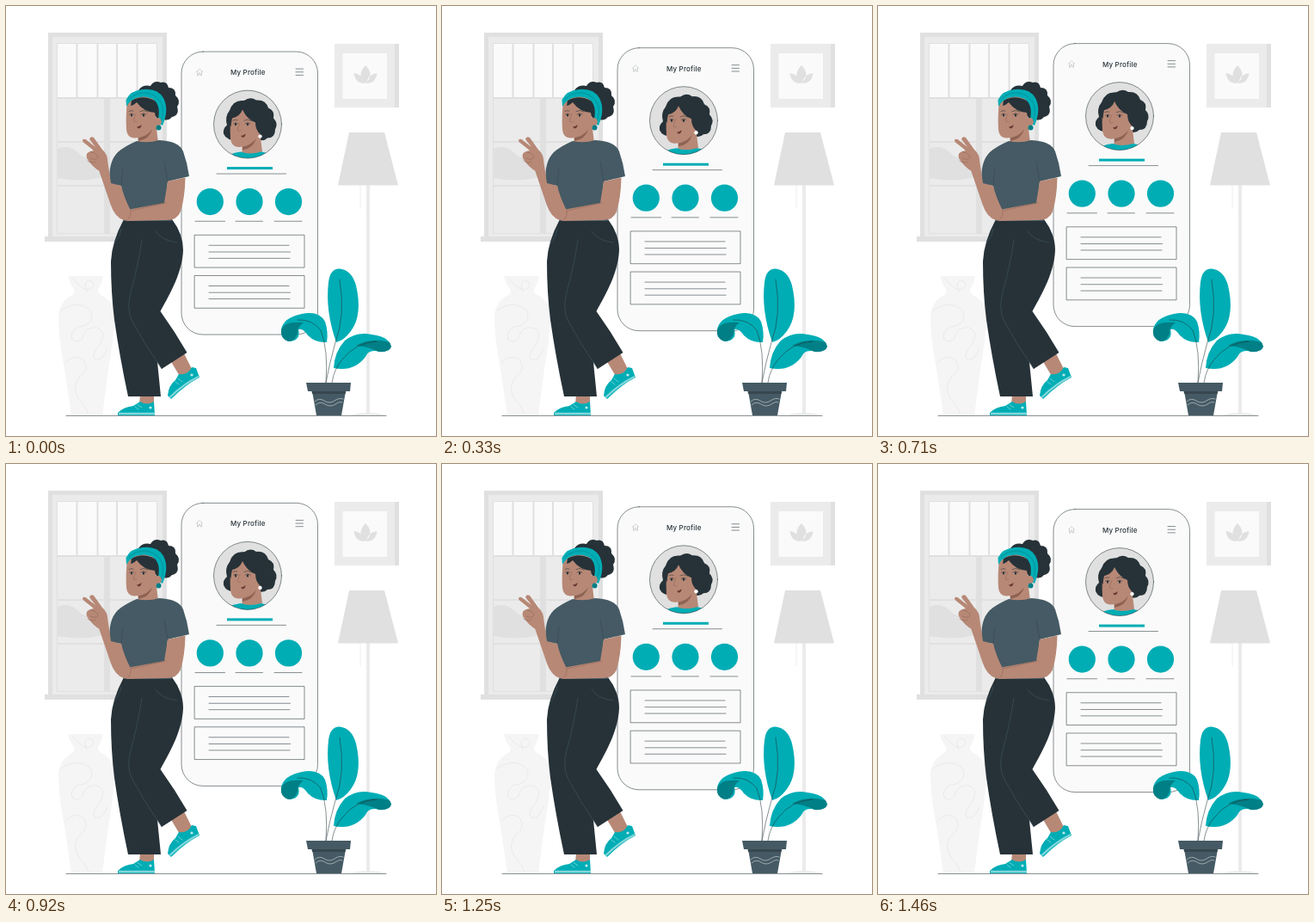
Write an HTML page that moves like this. It is 500x500 px and loops after 1500 ms.

```html
<!DOCTYPE html>
<html lang="en">
<head>
<meta charset="utf-8">
<title>Profile screen</title>
<style>
  html, body { margin: 0; width: 100%; height: 100%; overflow: hidden; background: #fff; }
  svg { display: block; width: 100vw; height: 100vh; }
  .teal { fill: #00adb5; }
  .deep { fill: #007f86; }
  .dark { fill: #263238; }
  .slate { fill: #455a64; }
  .skin { fill: #b78876; }
  .g1 { fill: #f5f5f5; }
  .g2 { fill: #ebebeb; }
  .g3 { fill: #e0e0e0; }
  .pane { fill: #fafafa; }
  .line { fill: none; stroke: #263238; stroke-width: .55; stroke-linecap: round; stroke-linejoin: round; }
  .seam { stroke: #455a64; }
  .fold { stroke: #8f6353; }
  .pale { stroke: #e0e0e0; }
  text { font: 500 8px Inter, "Open Sans", sans-serif; letter-spacing: .2px; text-anchor: middle; }
</style>
</head>
<body>
<svg viewBox="0 0 500 500">
  <defs>
    <clipPath id="round"><circle cx="281" cy="137" r="39.5"/></clipPath>
    <g id="face">
      <path class="skin" d="M153.500 140 V160 Q165 164 177 159 L174 135Z"/>
      <path d="M154 153 Q165 151 170 143 Q167 155 154 157Z" fill="#8f6353"/>
      <path class="skin" d="M141 110 Q139 128 140 144 Q141 153 149 153.500 Q160 154 168 145 L172 138 Q180 141 181 134 Q180 128 174 130 L172 108 Q154 98 141 110Z"/>
      <path class="line" d="M143 122.500 Q145 121 148 122 M156 122.500 Q160 120 165 123"/>
      <ellipse class="dark" cx="146" cy="127" rx="1.1" ry="1.6"/>
      <ellipse class="dark" cx="160" cy="127" rx="1.2" ry="1.7"/>
      <path class="line" d="M143.500 126 Q146 124 148.500 126 M157 126 Q160 123.500 163 126"/>
      <path class="line fold" d="M151 125 Q148 131 148.500 134 Q150 135.500 152 134.500"/>
      <path d="M152 140.500 Q155 140 157.500 138 Q157.500 142 154 142.500Z" fill="#6b3a33"/>
    </g>
  </defs>

  <!-- window -->
  <path class="g3" d="M49 31 H187 V269 H49Z"/>
  <path class="g2" d="M54 36 H182 V268 H54Z"/>
  <path class="g3" d="M59 43 H176 V265 H59Z"/>
  <path class="pane" d="M60 44h21.500v62h-21.500z M83.500 44h22v62h-22z M107.500 44h20.500v62h-20.500z M130 44h21.500v62h-21.500z M153.500 44H175v62h-21.500z"/>
  <path class="g2" d="M60 108h54v49H60z M121 108h54v49h-54z M60 159h54v49H60z M121 159h54v49h-54z M60 210h54v54H60z M121 210h54v54h-54z"/>
  <path class="g3" d="M60 166 Q72 161 82 169 Q91 179 101 177 Q110 177 114 184 V198 Q92 206 60 200Z"/>
  <path class="g3" d="M45 268 H190 V274 H45Z"/>

  <!-- wall picture -->
  <path class="g3" d="M382 44 H457 V118 H382Z"/>
  <path class="g2" d="M382 44 H452 V118 H382Z"/>
  <path class="pane" d="M391.500 55 H443 V108 H391.500Z"/>
  <path class="g3" d="M418 69 Q429 80 418 90 Q407 80 418 69Z M404.500 78 Q415 79 417 90 Q406 90 404.500 78Z M431.500 78 Q421 79 419 90 Q430 90 431.500 78Z"/>

  <!-- lamp -->
  <path class="g2" d="M419 208 H423 V474 H419Z M402 476 Q404 473.500 421 473 Q438 473.500 440 476Z"/>
  <path class="line pale" d="M412 208 V235"/>
  <path class="g3" d="M399 147 H440 L456 208.500 H386Z"/>

  <!-- vase -->
  <path class="g1" d="M72 314 H113 Q111 324 107 329 Q106 335 113 337 Q127 346 126 363 Q125 390 119 422 L112 476 H76 L68 422 Q61 385 61 363 Q61 346 75 337 Q81 335 79 329 Q74 323 72 314Z"/>
  <path class="line pale" d="M78 317 Q90 333 99 329 Q106 322 97 319 Q89 320 94 332 M64 354 Q78 344 91 349 Q103 354 99 365 Q94 373 84 373 Q74 378 77 388 Q84 393 89 386 Q92 372 106 374 Q118 378 109 394 Q98 406 104 411 Q112 414 118 398 M69 415 Q80 404 90 411 Q98 423 86 431 Q76 442 84 456 Q92 464 96 474"/>

  <path class="line" d="M70 476.500 H442"/>

  <!-- phone -->
  <g id="phone">
    <rect class="line" x="204" y="52.500" width="158.500" height="329" rx="25" style="fill:#fafafa"/>
    <path class="line" d="M221.500 76 L225 72.500 L228.500 76 M222.500 75.500 V80 H224 V77.500 H226 V80 H227.500 V75.500" stroke-opacity=".35"/>
    <text class="dark" x="281.300" y="79.600">My Profile</text>
    <path class="line" d="M337 72.500 H345.500 M337 76.200 H345.500 M337 79.800 H345.500"/>

    <circle class="g3" cx="281" cy="137" r="39.500"/>
    <g clip-path="url(#round)">
      <path class="dark" d="M260 121 Q264 108 277 109.500 Q284 104 291 109 Q302 108 305 118 Q313 121 311 130 Q317 136 313 143 Q313 153 304 153 Q299 158 291 154 L270 156 Q256 156 253 148 Q252 142 257 138 Q254 128 260 121Z"/>
      <use href="#face" x="121" y="10"/>
      <path class="dark" d="M259 136 Q257 110 280 109 Q299 112 304 150 Q298 152 294 147 Q290 142 290 135 Q280 131 275 120 Q272 128 263 130 Q262 134 261.500 140Z"/>
      <path class="teal" d="M248 180 Q257 171 273 169 Q283 173 297 169 Q309 171 314 180Z"/>
    </g>
    <circle cx="295.500" cy="151" r="2.200" fill="#fff"/>
    <circle class="line" cx="281" cy="137" r="39.500"/>

    <rect class="teal" x="257" y="186.500" width="53" height="3"/>
    <path class="line" d="M245 194.500 H325.500"/>
    <g class="teal">
      <circle cx="237.300" cy="227" r="15.600"/>
      <circle cx="283" cy="227" r="15.600"/>
      <circle cx="328.500" cy="227" r="15.600"/>
    </g>
    <path class="line" d="M220 249.700 H254.500 M267 249.700 H298.500 M312 249.700 H344"/>
    <g id="card">
      <path class="line" d="M219.500 265.700 H347 V303.500 H219.500Z M236 277.700 H329 M236 285.400 H330.500 M236 292.800 H330"/>
    </g>
    <use href="#card" y="47.200"/>
  </g>

  <!-- plant -->
  <path class="teal" d="M384 391 Q371 354 375 321 Q377 305 388 305.500 Q402 307 407 325 Q415 359 401 378 Q393 389 384 391Z"/>
  <path class="teal" d="M320 376 Q323 362 344 358 Q364 354 371 367 Q375 379 373 391 Q360 392 351 383 Q345 374 340 376 Q343 388 331 390 Q319 388 320 376Z"/>
  <path class="deep" d="M320 377 Q323 366 346 368 Q339 373 339 381 Q336 390 328 390 Q319 387 320 377Z"/>
  <path class="teal" d="M381 421 Q382 402 394 389 Q408 378 425 382 Q445 384 448 396 Q444 404 430 401 Q421 400 418 408 Q404 426 381 421Z"/>
  <path class="deep" d="M407 395 Q424 385 446 391 L448 396 Q446 403 433 402 Q422 396 407 395Z"/>
  <path class="line" d="M372 438 Q376 416 383 391 Q395 360 388 318 M372 438 Q375 400 366 377 Q356 364 339 365 M379 438 Q381 423 391 411 Q407 391 431 390"/>
  <path class="slate" d="M349 438 H401 L400 448 H395 L390 476 H361 L356 448 H351Z"/>
  <path d="M355.500 448 H395 L394.500 451 H356Z" fill="#37474f"/>
  <path class="line" d="M359 460 Q364 455 370 459 T382 459 T392 457 M360 464 Q365 459 371 463 T383 463 T391 461" style="stroke:#dfe7ea"/>

  <!-- woman: feet and legs -->
  <path class="skin" d="M156 451 H172 L172 464 H155Z M191 412 L207 404 L217 424 L203 432Z"/>
  <path class="teal" d="M130 473 Q137 466 148 465 L156 460 Q164 465 172 460 L173 476 H130Z"/>
  <path class="teal" d="M188 453 Q189 441 197 435 L201 428 Q211 430 216 420 L221 421 L225 432 Q209 440 192 457Z"/>
  <path class="line" d="M131 474 H173 M190.500 455 Q207 439 224 431" style="stroke:#80d6da;stroke-width:2.400;stroke-linecap:butt"/>
  <path class="line" d="M150 466 L154 469 M153 463.500 L158 467 M197 437 L201 440 M200 433 L205 437" style="stroke:#bfeaec"/>
  <circle cx="168" cy="467" r="1.600" fill="#bfeaec"/>
  <circle cx="216" cy="429" r="1.600" fill="#bfeaec"/>
  <path class="dark" d="M137 248 H193 Q206 265 206 284 C205 310 191 334 179.500 355 Q196 378 210.500 403 L181 422 L176 414 L180 454 H142 Q132 407 126 365 Q122 333 122 297 Q123 274 137 248Z"/>
  <path class="line seam" d="M158 272 Q154 300 145 333 Q140 351 146 365 Q161 393 181 422 M134 259 Q132 270 126 276 M174 262 Q181 273 199 275"/>

  <!-- woman: head -->
  <path class="dark" d="M154 98 Q159 91 168 93 Q172 86 180 89 Q187 87 189 95 Q198 95 197 104 Q204 110 199 117 Q202 127 193 129 Q188 135 181 131 L168 126Z"/>
  <use href="#face"/>
  <path class="dark" d="M146 110 Q158 103 171 109 Q180 118 180 135 Q175 134 173 124 Q160 123 152 112 Q149 115 145 116Z"/>
  <path class="teal" d="M139.500 109 Q145 98 159 97 Q176 95 183 107 Q190 120 182 139 L176 136 Q181 117 172 109 Q162 103 151 107 Q144 110 140 117Z"/>
  <path class="line" d="M143 108 Q152 100 164 101 Q177 104 182 116 Q184 124 180 134" style="stroke:#007f86"/>
  <path class="skin" d="M173 131 Q180 128 181 135 Q179 142 172 139Z"/>
  <circle class="deep" cx="177.500" cy="141.500" r="3"/>

  <!-- woman: torso -->
  <path class="slate" d="M152 157 Q165 160 178 156 Q201 157 206 169 Q211 183 213 198 L188 204 L186 229 L193 250 H137 L134 209 L121 207 Q118 182 130 170 Q138 163 152 157Z"/>
  <path class="line" d="M188 204 L184 181 M134 208 L136 190" style="stroke:#37474f"/>

  <!-- woman: arms and hand -->
  <path class="skin" d="M188 204 L208.500 199.500 Q208 223 203 239 Q199 250 184 249 L140 250 Q134 246 141 237 L184 229Z"/>
  <path class="skin" d="M107 188 L118 179 L122 206 L134 209 Q137 222 145 238 Q146 249 137 249 Q127 246 122 232Z"/>
  <path class="skin" d="M94 177 Q92 171 98 169 L102 168 L89.500 158 Q88 154 92.500 155 L104 164 L97 155 Q98 151 102 153 L112 167 Q119 173 118 182 L109 192 Q101 188 94 177Z"/>
  <path class="line fold" d="M99 170 Q106 171 107 176 Q104 180 98 177 M95 180 Q100 184 104 181 M145 238 Q146 245 141 249 M186 229 L145 238"/>
</svg>
<script>
  const PERIOD = 1500, LIFT = 10, REST = .6;
  const phone = document.getElementById('phone');

  function draw() {
    const p = (performance.now() % PERIOD) / PERIOD;
    const y = REST - LIFT * (1 - Math.abs(1 - 2 * p));
    phone.setAttribute('transform', `translate(0 ${y})`);
    requestAnimationFrame(draw);
  }
  draw();
</script>
</body>
</html>
```
